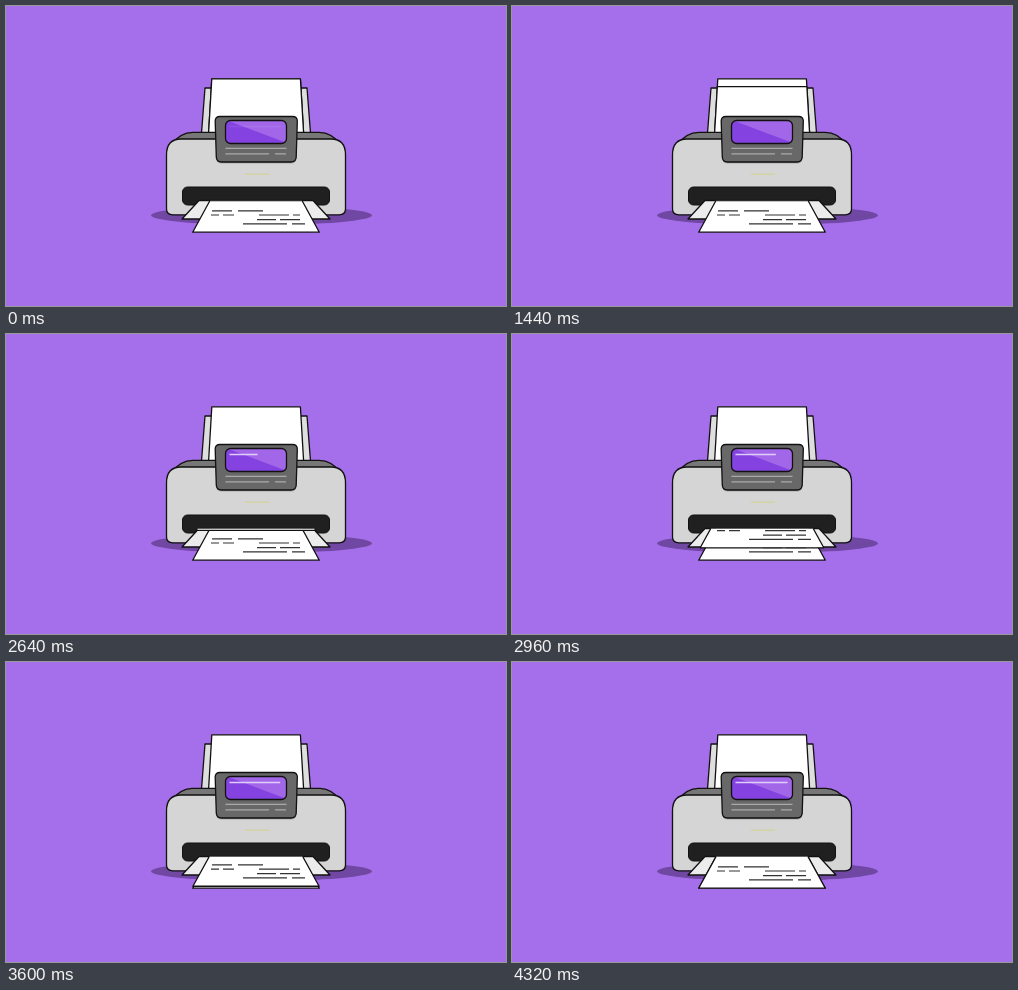
Animation, 500 px wide and 300 px high, one loop 4800 ms. Source, as an HTML page:

```html
<!DOCTYPE html>
<html lang="en">
<head>
<meta charset="utf-8">
<title>Printer</title>
<style>
  html, body { margin: 0; width: 100%; height: 100%; overflow: hidden; background: #a56eea; }
  svg { display: block; width: 500px; height: 300px; }
  .ink { stroke: #111; stroke-width: 1.3; stroke-linejoin: round; }
</style>
</head>
<body>
<svg viewBox="0 0 500 300" fill="none">
  <defs>
    <clipPath id="outlet"><path d="M170 194.5H330V240H170Z"/></clipPath>
    <clipPath id="glass"><rect x="219.5" y="114.5" width="61" height="23" rx="5"/></clipPath>
    <path id="print" d="M206 204.8H226M232 204.8H257M205 209H213M217 209H228M253 209H283M287 209H294
      M251 213.6H270M274 213.6H294M237 217.8H281M286 217.8H299"/>
    <path id="panel" d="M214 110.5H286.5Q291.5 110.5 291.3 115.5L290.2 151Q290 156 285 156H215.5Q210.5 156 210.3 151L209.2 115.5Q209 110.5 214 110.5Z"/>
  </defs>

  <ellipse cx="255.5" cy="209.3" rx="110.5" ry="9.7" fill="#7047a2"/>

  <!-- paper feed -->
  <path class="ink" fill="#dedede" d="M199 82H301L304.5 127H195.5Z"/>
  <path class="ink" fill="#fff" d="M205.8 72.8H294.4L297.6 127H202.6Z"/>
  <path id="feed" class="ink" fill="#fff"/>

  <!-- body -->
  <path class="ink" fill="#777" d="M165 139Q174 126.3 187 126.3H313Q326 126.3 335 139Z"/>
  <path class="ink" fill="#d5d5d5" d="M160.5 149Q160.5 133 175 133H325Q339.5 133 339.5 149V203Q339.5 208.8 333 208.8H167Q160.5 208.8 160.5 203Z"/>
  <path stroke="#d3d28c" d="M239 168.2H263"/>
  <rect x="176.5" y="181" width="147" height="18" rx="5" fill="#202020" stroke="#111"/>

  <!-- output -->
  <path class="ink" fill="#ececec" d="M193 194.5H307L324 213H176Z"/>
  <g clip-path="url(#outlet)">
    <path class="ink" fill="#fff" d="M204 194.5H296L313.3 226.2H186.7Z"/>
    <use href="#print" stroke="#333" stroke-width="1.2"/>
    <g id="fresh">
      <path id="sheet" class="ink" fill="#fff"/>
      <use id="text" href="#print" stroke="#333" stroke-width="1.2"/>
    </g>
  </g>

  <!-- control panel -->
  <use href="#panel" y="1.6" fill="#a6a6a6"/>
  <use href="#panel" class="ink" fill="#686868"/>
  <g clip-path="url(#glass)">
    <path fill="#8442e0" d="M219 114H282V139H219Z"/>
    <path fill="#a267e9" d="M220 114H282V137.5Z"/>
  </g>
  <rect class="ink" x="219.5" y="114.5" width="61" height="23" rx="5"/>
  <path stroke="#a9a9a9" stroke-width="1.2" d="M219.5 142.4H280.5M219.5 147.8H263M269 147.8H280"/>
  <path id="progress" stroke="#e0cdf8" stroke-width="1.5"/>
</svg>
<script>
const LOOP = 4800, START = 640, END = 4320;
const $ = id => document.getElementById(id);
const set = (id, name, value) => $(id).setAttribute(name, value);
const clamp = (v, lo = 0, hi = 1) => Math.min(hi, Math.max(lo, v));

function drawFeed(t) {
  const drop = clamp(43 * clamp((t - START) / 1160, 0, 2) ** 4.6, 0, 54);
  const lean = drop * 3.2 / 54.2;
  set('feed', 'd', `M${205.8 - lean} ${72.8 + drop}H${294.4 + lean}L297.6 127H202.6Z`);
  set('feed', 'visibility', drop < 54 ? 'visible' : 'hidden');
}

function drawOutput(t) {
  const decay = time => 17.6 * Math.exp((2840 - time) * 0.0027);
  const lag = Math.max(0, decay(t) - decay(END));
  const bottom = 226.2 - lag;
  const half = 63.3 - lag * 0.12;
  const top = half - (bottom - 194) * 0.55;
  set('fresh', 'visibility', bottom > 194 ? 'visible' : 'hidden');
  set('sheet', 'd', `M${250 - top} 194H${250 + top}L${250 + half} ${bottom}H${250 - half}Z`);
  set('text', 'transform', `translate(0 ${-lag})`);
}

function drawProgress(t) {
  const middle = 2600;
  const done = t < middle
    ? 0.5 * clamp((t - 1760) / 840) ** 2
    : 1 - 0.5 * clamp((END - t) / 1720) ** 3.4;
  const fading = t < 320;
  set('progress', 'd', `M223.5 120.5H${223.5 + 52 * (fading ? 1 : done)}`);
  set('progress', 'opacity', fading ? 0.1 * clamp((320 - t) / 160) : done > 0 ? 1 : 0);
}

function frame() {
  const t = Math.floor(performance.now() % LOOP / 40) * 40;
  drawFeed(t);
  drawOutput(t);
  drawProgress(t);
  requestAnimationFrame(frame);
}
frame();
</script>
</body>
</html>
```
